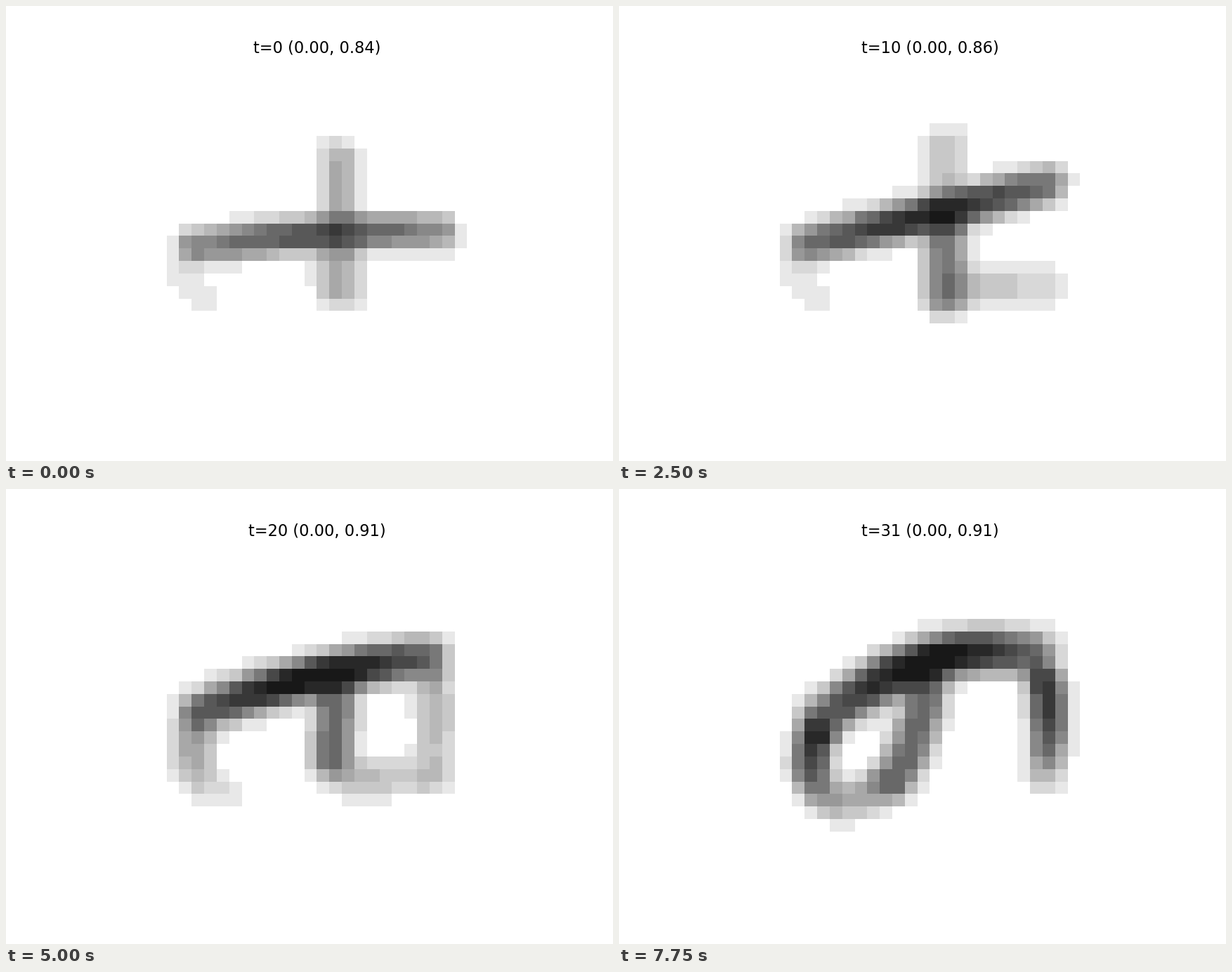
Write a matplotlib script that moves like this. It is 864 by 648 pixels and loops after 8000 ms.

```python
import math

import numpy as np
import matplotlib.pyplot as plt
from matplotlib.animation import FuncAnimation

SIZE = 28          # cells per side
FRAMES = 32
INTERVAL = 250
BLACK = 15         # darkness of full ink

centre = np.arange(SIZE) + .5
gx, gy = np.meshgrid(centre, centre)
along = np.linspace(0, 1, 90)


def ease(t, start, end):
    u = np.clip((t - start) / (end - start), 0, 1)
    return u * u * (3 - 2 * u)


def bezier(points):
    n = len(points) - 1
    weights = [math.comb(n, k) * along ** k * (1 - along) ** (n - k)
               for k in range(n + 1)]
    return np.array(points, dtype=float).T @ np.array(weights)


def stroke(points, width, dark):
    """Darkness of a soft pen line with a flat core."""
    x, y = bezier(points)[:, :, None, None]
    dark = (dark * np.ones_like(along))[:, None, None]
    dist = np.hypot(gx - x, gy - y)
    return (dark * np.exp(-(dist / width) ** 2.7)).max(axis=0)


def strokes(t):
    spine = np.interp(t, [0, 7, 17, 31], [15.8, 14.9, 16, 13.8])

    # long bar: its right end swings up, then the whole bar arches
    lx = 4.3 + 1.2 * ease(t, 14, 30)
    ly = np.interp(t, [0, 8, 17, 31], [14.9, 15, 13.3, 14])
    rx, ry = 23.8 - .05 * t, 8.85 + 4.8 * math.exp(-t / 6.5)
    lift = np.interp(t, [0, 7, 13, 23, 28, 31], [.4, -.2, 0, .85, 1.9, 2.1])
    mx, my = (lx + rx) / 2, (ly + ry) / 2
    peak = 10.3 + 4 * ease(t, 0, 17)
    yield stroke([(lx, ly), (mx, my - 2 * lift), (rx, ry)], 1.4 + .014 * t,
                 peak * (.65 + .35 * np.sin(np.pi * along)))

    # mast above the bar, fading away
    yield stroke([(spine, 7.9 - .1 * t), (spine, 12.5)], 1.5,
                 np.interp(t, [0, 7, 13, 16], [4.6, 5.7, 1.1, 0]))

    # stem below the bar, leaning left later on
    turn = ease(t, 17, 30)
    fx, fy = spine - 2.7 * turn, 18 + .9 * math.sin(2 * np.pi * t / 26)
    head = my - lift + 1
    yield stroke([(spine, head), ((spine + fx) / 2 + 1.2 * turn, (head + fy) / 2),
                  (fx, fy)], 1.7,
                 np.interp(t, [0, 7, 17, 23, 31], [4.9, 7.5, 10, 7.4, 9.2]))

    # hook to the lower right, comes and goes
    hook = np.interp(t, [6, 13, 17, 23, 26], [0, 1, 1, .28, 0])
    hy = 18 + 1.2 * ease(t, 17, 23)
    yield stroke([(17, hy), (23.5, hy)], 1.5, 6.4 * hook * (1 - .42 * along))

    # right leg
    yield stroke([(23.2, 11.2), (23.8, 14.5), (23.1, 18.5)], 1.5,
                 12 * ease(t, 16, 26) * (1 - .75 * along ** 3))

    # left leg, growing round to the foot of the stem
    grow = ease(t, 14, 27)
    fade = 1 - .4 * ease(t, 20, 28)
    yield stroke([(3.6 + 1.3 * grow, 15.5), (3.6, 19), (6, 21.8),
                  (fx - 1.6, fy + .9)], 1.6,
                 12 * max(.1, grow) * (1 - fade * ease(along, 0, .8)))


def picture(t):
    paper = np.ones((SIZE, SIZE))
    for ink in strokes(t):
        paper *= 1 - ink / BLACK
    # even grey steps, the lightest being white
    level = np.clip(np.round(BLACK * (1 - paper)), 0, BLACK - 1)
    return np.where(level == 0, 255, 248 - 16 * level)


def score(t):
    return np.interp(t, [0, 7, 13, 17, 23, 27, 31],
                     [.84, .86, .86, .93, .88, .92, .91])


fig, ax = plt.subplots(figsize=(6.4, 4.8), dpi=135)
image = ax.imshow(picture(0), cmap="gray", vmin=0, vmax=255,
                  interpolation="nearest")
title = ax.set_title("", fontsize=12, fontfamily="DejaVu Sans")
ax.axis("off")


def update(t):
    image.set_data(picture(t))
    title.set_text(f"t={t} (0.00, {score(t):.2f})")
    return image, title


anim = FuncAnimation(fig, update, frames=FRAMES, interval=INTERVAL,
                     repeat=True, repeat_delay=0)
plt.show()
```
